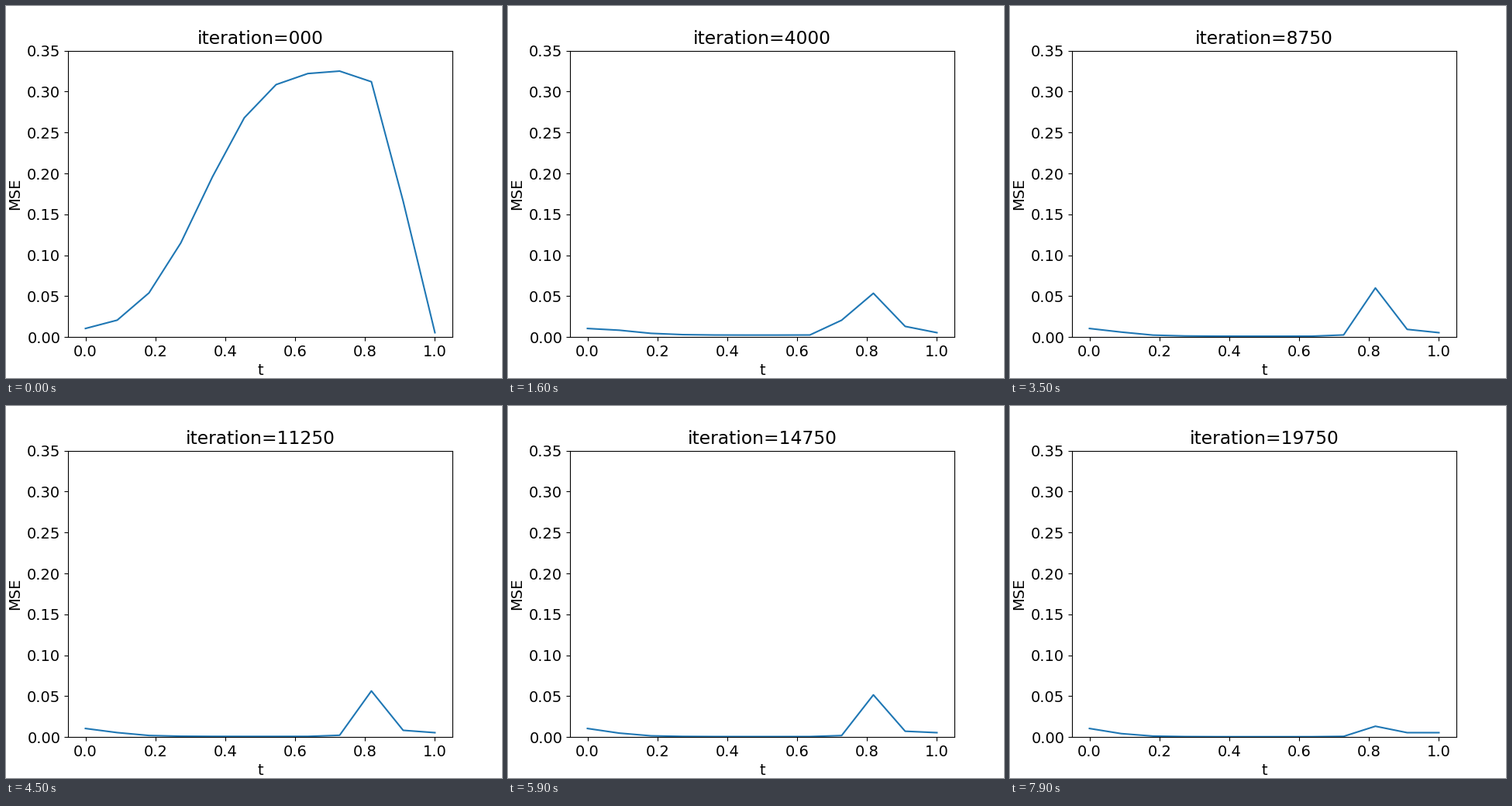
A matplotlib script that plays this animation: 640x480 px, repeating every 8000 ms.

```python
import matplotlib.pyplot as plt
import numpy as np
from matplotlib.animation import FuncAnimation

FRAMES, INTERVAL, STEP = 80, 100, 250

plt.rcParams["font.family"] = "DejaVu Sans"
plt.rcParams["font.size"] = 14

# Untrained error along t.
start = np.array([0.0105, 0.0207, 0.054, 0.115, 0.196, 0.268,
                  0.3085, 0.322, 0.325, 0.312, 0.166, 0.0054])
t = np.linspace(0, 1, len(start))
spacing = t[1]

# Decay exponent: zero at both fixed ends, fastest in the middle.
power = 1.08 * (1 - np.abs(2 * t - 1) ** 3.4)


def spike(frame):
    """Residual error front that drifts right, stops, then fades."""
    center = spacing * min(9, 7.8 + 0.052 * frame)
    height = np.interp(frame, [0, 1, 23, 35, 59, 79],
                       [0, 0.082, 0.082, 0.0575, 0.05, 0.012])
    width = 0.36 * spacing
    return height * np.exp(-0.5 * ((t - center) / width) ** 2)


def mse(frame):
    decay = ((1 + frame) ** power - 1) / 0.05
    return 1 / (1 / start + decay) + spike(frame)


fig, ax = plt.subplots(figsize=(6.4, 4.8), dpi=100)
line, = ax.plot(t, mse(0))
ax.set_ylim(0, 0.35)
ax.set_xlabel("t")
ax.set_ylabel("MSE")
title = ax.set_title("iteration=000")


def update(frame):
    line.set_ydata(mse(frame))
    title.set_text(f"iteration={frame * STEP:03d}")
    return line, title


anim = FuncAnimation(fig, update, frames=FRAMES, interval=INTERVAL,
                     repeat=True, repeat_delay=0)
plt.show()
```
